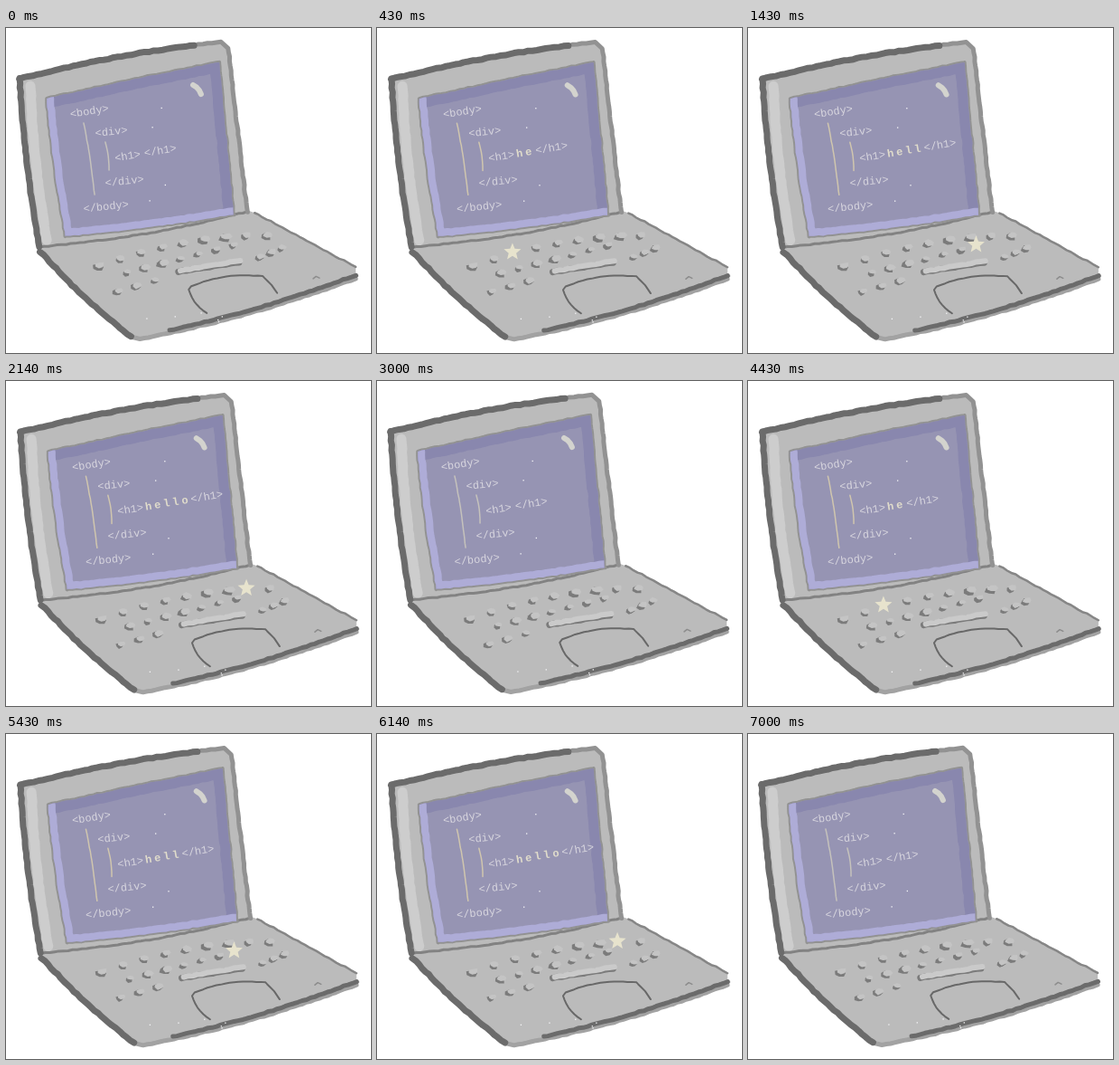
Write an HTML page with a canvas that moves like this. It is 404 px wide and 359 px high and loops after 8000 ms.

```html
<!DOCTYPE html>
<html lang="en">
<head>
<meta charset="utf-8">
<title>Typing laptop</title>
<style>
html, body { margin: 0; width: 100%; height: 100%; overflow: hidden; background: #fff; }
canvas { display: block; }
</style>
</head>
<body>
<canvas id="stage" width="404" height="359"></canvas>
<script>
const ctx = document.getElementById('stage').getContext('2d');
const MONO = '"Liberation Mono", "Courier New", monospace';
const WORD = 'hello', HALF = 4000, REST = 3000;
const DARK = '#6b6b6b', MID = '#929292', BODY = '#bbbbbb', LIGHT = '#cdcdcd';
const GLASS = '#9694b3', SHADE = '#8987ae', GLOW = '#aeacd7';

let pose = 0, seed = 1;

function rand() {
  seed = (seed * 16807) % 2147483647;
  return seed / 2147483647 - 0.5;
}

// The drawing widens slightly while typing.
const warp = (x, y) => [x + pose * (0.5 + 3.2 * Math.sin(Math.PI * x / 400)), y + pose * 0.3];

// Hand-drawn line from a to b, bowed to its right-hand side.
function edge([ax, ay], [bx, by], bow = 0, wobble = 1) {
  const dx = bx - ax, dy = by - ay, len = Math.hypot(dx, dy);
  const n = Math.max(2, Math.round(len / 5));
  return Array.from({ length: n + 1 }, (_, i) => {
    const u = i / n, off = bow * Math.sin(Math.PI * u);
    return [ax + dx * u - dy / len * off + rand() * wobble,
            ay + dy * u + dx / len * off + rand() * wobble];
  });
}

function trace(pts) {
  ctx.beginPath();
  for (const p of pts) ctx.lineTo(...warp(...p));
}

function fill(color, pts) {
  trace(pts);
  ctx.fillStyle = color;
  ctx.fill();
}

function stroke(color, width, pts) {
  trace(pts);
  ctx.strokeStyle = color;
  ctx.lineWidth = width;
  ctx.stroke();
}

function scatter(count, x, y, w, h) {
  ctx.fillStyle = '#f6f6f8';
  for (let i = 0; i < count; i++) {
    ctx.fillRect(...warp(x + rand() * w, y + rand() * h), 1.3, 1.3);
  }
}

function tilted(x, y, degrees, draw) {
  ctx.save();
  ctx.translate(...warp(x, y));
  ctx.rotate(degrees * Math.PI / 180);
  draw();
  ctx.restore();
}

function write(text, x, y, degrees) {
  tilted(x, y, degrees, () => ctx.fillText(text, 0, 0));
}

function drawBase() {
  const left = [38, 247], front = [138, 341], right = [387, 264], low = [387, 277];
  const hinge = [275, 204];
  const slope = edge(left, front, 3);
  const rim = edge([148, 344], low, 5);
  const side = edge(hinge, right);
  fill(BODY, [[45, 236], [264, 200], ...side, ...rim.slice().reverse(), ...slope.slice().reverse()]);
  stroke('#a2a2a2', 5, [front, ...rim]);
  stroke(DARK, 5, edge([181, 334], [387, 273], 4));
  stroke(DARK, 7, slope);
  stroke('#868686', 2.5, side);
  scatter(6, 200, 320, 90, 14);
}

function drawLid() {
  const left = [15, 56], right = [238, 15], shoulder = [246, 22];
  const foot = [267, 203], heel = [37, 242];
  const top = edge(left, right, -4);
  const back = edge(shoulder, foot);
  const hinge = edge(heel, foot, 5);
  const spine = edge(heel, left, -3);
  fill(BODY, [...top, ...back, ...hinge.slice().reverse(), ...spine]);
  stroke(LIGHT, 11, edge([27, 64], [45, 234], 3));
  stroke('#828282', 3, hinge);
  stroke(MID, 5, [...top.slice(-6), ...back]);
  stroke(DARK, 7, [...spine, ...top.slice(0, -6)]);
}

function drawScreen() {
  const tl = [45, 78], tr = [236, 38], br = [252, 206], bl = [66, 230];
  const top = edge(tl, tr, -1), right = edge(tr, br);
  const bottom = edge(br, bl, -2), left = edge(bl, tl, -2);
  const outline = [...top, ...right, ...bottom, ...left];
  stroke(MID, 4, outline);
  fill(GLASS, outline);
  ctx.save();
  trace(outline);
  ctx.clip();
  stroke(SHADE, 22, [...top, ...right]);
  stroke(GLOW, 16, [...bottom, ...left]);
  ctx.restore();
  stroke('#d3d3ce', 6, edge([207, 63], [216, 73], -1.5, 0.3));
  scatter(4, 150, 140, 120, 130);
}

function drawCode(count) {
  const guide = count ? '#d0c6ae' : '#c5c2bc';
  stroke(guide, 1.5, edge([86, 105], [98, 184], -1, 0.4));
  stroke(guide, 1.5, edge([110, 126], [114, 157], -1, 0.4));

  ctx.fillStyle = '#d8d6df';
  ctx.font = '12px ' + MONO;
  write('<body>', 71.5, 99, -9);
  write('<div>', 99, 120, -6);
  write('</div>', 110, 175, -6);
  write('</body>', 86, 203.5, -6);

  tilted(121, 147.5, -9.5, () => {
    ctx.fillText('<h1>', 0, 0);
    ctx.fillText('</h1>', 33 + 9.8 * count, 0);
    ctx.fillStyle = '#e0dccb';
    ctx.font = 'bold 12px ' + MONO;
    for (let i = 0; i < count; i++) ctx.fillText(WORD[i], 31 + 10.2 * i, 0);
  });
}

// Evenly spaced keys; curve > 1 makes the row flatten towards its right end.
function keyRow(letters, [ax, ay], [bx, by], curve = 1) {
  return [...letters].map((letter, i) => {
    const u = i / (letters.length - 1);
    return { letter, x: ax + (bx - ax) * u, y: by + (ay - by) * (1 - u) ** curve };
  });
}

const KEYS = [
  ...keyRow('qwertyuop', [103, 263], [289, 229], 2),
  ...keyRow('asdghkl', [134, 270], [252, 240]),
  ...keyRow('zxc', [124, 291], [165, 279]),
  ...keyRow('nm.', [281, 253], [305, 243])
];

function blob(color, x, y, rx, ry) {
  fill(color, Array.from({ length: 7 }, (_, i) => {
    const a = i * Math.PI * 2 / 7, r = 1 + rand() * 0.5;
    return [x + rx * r * Math.cos(a), y + ry * r * Math.sin(a)];
  }));
}

function drawKey({ x, y }) {
  const size = 1 + rand() * 0.4;
  blob('#7b7b7b', x - 1, y + 1, 5 * size, 3.8 * size);
  blob('#c4c4c4', x + 1, y - 1, 5 * size, 3.2 * size);
}

function drawStar(x, y) {
  const [cx, cy] = warp(x, y);
  ctx.beginPath();
  for (let i = 0; i < 10; i++) {
    const r = i % 2 ? 4.4 : 10, a = i * Math.PI / 5 - Math.PI / 2;
    ctx.lineTo(cx + r * Math.cos(a), cy + r * Math.sin(a));
  }
  ctx.fillStyle = '#e7e3cd';
  ctx.fill();
}

function drawKeyboard(count) {
  const active = count && KEYS.find(key => key.letter === WORD[count - 1]);

  stroke('#7b7b7b', 7, edge([191, 269], [258, 259]));
  stroke('#cacaca', 6, edge([193, 268], [259, 257]));

  const pad = [...edge([222, 315], [202, 289], -3, 0.6),
    ...edge([205, 285], [284, 274], -5, 0.6), ...edge([286, 276], [300, 293], -1, 0.6)];
  stroke('#686868', 2, pad);
  stroke('#8c8c8c', 1.5, edge([340, 277], [347, 276], -2, 0.3));

  for (const key of KEYS) if (key !== active) drawKey(key);
  if (active) drawStar(active.x - 3, active.y - 1);
}

// Each letter takes longer than the one before.
function typed(local) {
  if (local >= REST) return 0;
  let count = 0;
  while (count < WORD.length && local >= 1000 * (count + 1) * (count + 2) / 14 - 2.9) count++;
  return count;
}

function render(time) {
  const count = typed(time % HALF);
  pose = count ? 1 : 0;
  seed = 4211;
  ctx.fillStyle = '#fff';
  ctx.fillRect(0, 0, 404, 359);
  ctx.lineCap = ctx.lineJoin = 'round';
  drawBase();
  drawLid();
  drawScreen();
  drawCode(count);
  drawKeyboard(count);
}

const start = performance.now();
function tick() {
  render(performance.now() - start);
  requestAnimationFrame(tick);
}
tick();
</script>
</body>
</html>
```
